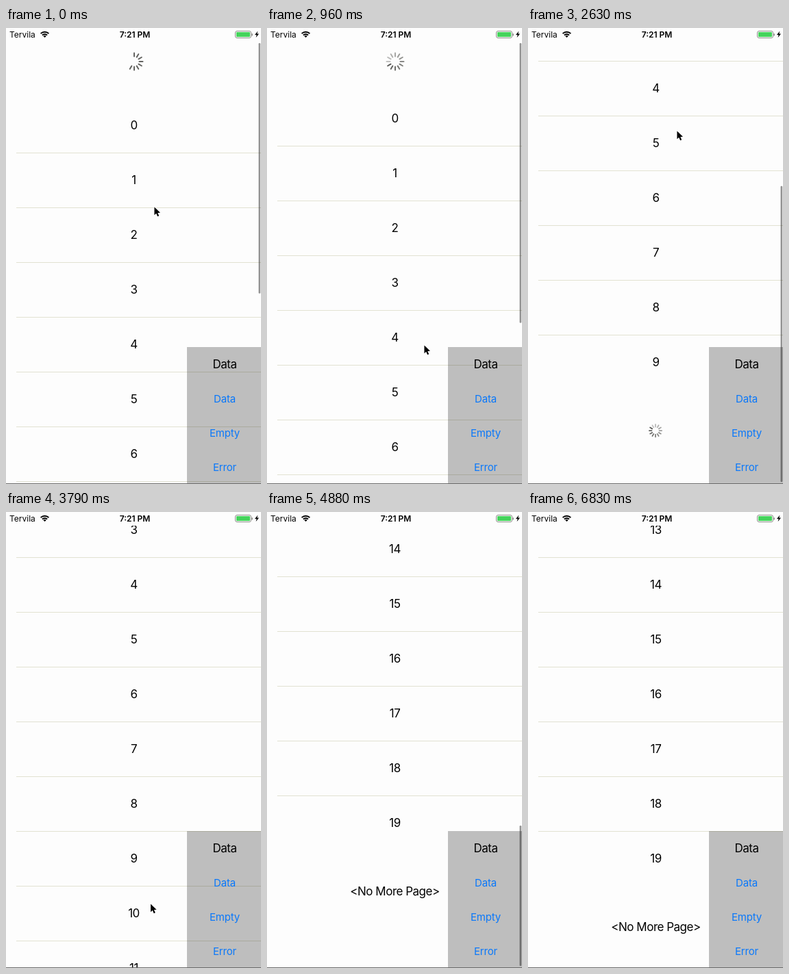
An HTML page with a canvas for the animation above (6930 ms loop, 372 by 666 pixels).

```html
<!DOCTYPE html>
<html>
<head>
<meta charset="utf-8">
<style>
  html, body { margin: 0; width: 100%; height: 100%; overflow: hidden; background: #fdfdfd; }
  canvas { display: block; }
</style>
</head>
<body>
<canvas id="stage" width="372" height="666"></canvas>
<script>
const c = document.getElementById('stage').getContext('2d');
const LOOP = 6930, ROW = 80, REST = 58, VIEW = 646;
const TRIGGER = 300, REFRESHED = 1450, LOADED = 3400;

const smooth = u => u * u * (3 - 2 * u);
const out = u => 1 - (1 - u) ** 3;
const clamp = u => Math.max(0, Math.min(1, u));

// Keys are [time, value, easing used to get there].
const firstRow = [
  [0, 142], [600, 215, out], [1356, 118, out], [1450, 118], [1700, 58, smooth],
  [2170, 58], [2560, -239.3, smooth], [3210, -214, out],
  [4270, -214], [4780, -1091.6, smooth], [5580, -1014, out]
];
const cursorX = [[0, 216], [600, 229, smooth], [960, 229], [1750, 214, smooth],
  [2170, 214], [2560, 217], [3100, 217], [3700, 210, smooth], [4600, 216]];
const cursorY = [[0, 260], [600, 463, out], [960, 463], [1700, 514, smooth],
  [2170, 520], [2560, 150, smooth], [3100, 150], [3700, 572, smooth],
  [3850, 572], [4150, 626, smooth], [4270, 626], [4620, -24, smooth]];

function at(keys, t) {
  const i = keys.findIndex(k => k[0] > t);
  if (i < 0) return keys[keys.length - 1][1];
  const [t0, a] = keys[i - 1], [t1, b, ease = u => u] = keys[i];
  return a + (b - a) * ease((t - t0) / (t1 - t0));
}

function text(s, x, y, size, color = '#000', weight = 400, align = 'center') {
  c.font = `${weight} ${size}px Inter, Roboto, sans-serif`;
  c.letterSpacing = size > 16 ? '-0.5px' : size > 13 ? '-0.2px' : '0px';
  c.textAlign = align;
  c.fillStyle = color;
  c.fillText(s, x, y);
}

function box(x, y, w, h, r, color) {
  c.fillStyle = color;
  c.beginPath();
  c.roundRect(x, y, w, h, r);
  c.fill();
}

function polygon(points) {
  c.beginPath();
  points.forEach(([x, y]) => c.lineTo(x, y));
  c.closePath();
}

function spinner(x, y, r, width, alpha) {
  c.save();
  c.translate(x, y);
  c.strokeStyle = '#3c3c38';
  c.lineWidth = width;
  c.lineCap = 'round';
  for (let k = 0; k < 12; k++) {
    c.globalAlpha = alpha(k);
    c.beginPath();
    c.moveTo(0, -r * 0.55);
    c.lineTo(0, -r + width / 2);
    c.stroke();
    c.rotate(Math.PI / 6);
  }
  c.restore();
}

const spinning = (t, phase) => {
  const head = Math.floor(t * 12 / 1000) + phase;
  return k => 0.25 + 0.6 * (1 - ((head - k + 24) % 12) / 12);
};

function refreshControl(t, pull) {
  if (t < TRIGGER) {
    const shown = 8 + Math.floor((pull - 84) / 6);
    spinner(187, 49, 13.5, 2, k => k < shown ? 0.8 : 0);
  } else if (t < 1700) {
    const fade = 1 - clamp((t - REFRESHED) / 220), alpha = spinning(t, 9);
    spinner(187, 49, 13.5 * (0.4 + 0.6 * fade), 2, k => alpha(k) * fade);
  }
}

function list(t, y0) {
  const count = t < LOADED ? 10 : 20;
  c.save();
  c.beginPath();
  c.rect(0, 20, 372, 646);
  c.clip();
  if (t < 1700) refreshControl(t, y0 - REST);
  for (let k = 0; k < count; k++) {
    const y = y0 + k * ROW;
    if (y < -50 || y > 720) continue;
    text(k, 186.5, y + 6, 17);
    if (k < count - 1) {
      c.fillStyle = '#e2e2d2';
      c.fillRect(15, Math.round(y + 40), 357, 1);
    }
  }
  const foot = y0 + count * ROW + 20;
  if (count === 10) spinner(186, foot, 10, 1.8, spinning(t, 3));
  else text('<No More Page>', 186.5, foot + 6, 17);
  c.restore();
}

function panel() {
  c.fillStyle = 'rgba(0,0,0,.25)';
  c.fillRect(264, 466, 108, 200);
  text('Data', 319, 497, 17);
  ['Data', 'Empty', 'Error'].forEach((s, i) =>
    text(s, 319, 546.5 + 50 * i, 15, '#0a78fa'));
}

function scrollBar(t, y0) {
  const show = (from, to) => t < from ? 0 : 1 - clamp((t - to) / 250);
  const alpha = t < 2000 ? show(0, 1420) : t < 4000 ? show(2180, 3250) : show(4270, 6050);
  if (!alpha) return;
  const inset = t >= TRIGGER && t < REFRESHED ? 60 : 0;
  const more = t >= LOADED;
  const s = REST - y0 + inset, max = (more ? 1072 : 272) + inset;
  const content = (more ? 1612 : 920) + inset;
  const over = Math.max(0, -s, s - max);
  const size = 641 * VIEW / content - over;
  const top = 22 + (641 - size) * clamp(s / max);
  box(368.5, top, 2.7, size, 1.3, `rgba(0,0,0,${0.42 * alpha})`);
}

function statusBar() {
  text('Tervila', 5, 14, 12, '#000', 400, 'left');
  text('7:21 PM', 188, 14, 12, '#000', 600);

  const wifi = (r, w) => {
    c.lineWidth = w;
    c.beginPath();
    c.arc(56.5, 14, r, -Math.PI * 0.75, -Math.PI * 0.25);
    c.stroke();
  };
  c.strokeStyle = '#000';
  c.lineCap = 'butt';
  wifi(1.5, 3);
  wifi(5, 1.9);
  wifi(8.3, 1.9);

  c.strokeStyle = '#8c8c88';
  c.lineWidth = 1;
  c.beginPath();
  c.roundRect(334.5, 4.5, 23, 10, 2.5);
  c.stroke();
  box(336, 6, 20, 7, 1, '#45d45c');
  box(358.5, 8, 1.5, 3.5, 0.7, '#8c8c88');
  c.fillStyle = '#000';
  polygon([[367.3, 4.5], [363, 10], [365.6, 10], [364.6, 14], [369, 8.4], [366.3, 8.4]]);
  c.fill();
}

function cursor(x, y) {
  c.save();
  c.translate(x, y);
  c.scale(0.9, 0.9);
  polygon([[0.5, 0.5], [0.5, 13.5], [3.5, 10.8], [5.7, 15.8], [8, 14.8], [5.9, 9.9], [10, 9.7]]);
  c.lineJoin = 'round';
  c.lineWidth = 2;
  c.strokeStyle = '#fff';
  c.stroke();
  c.fillStyle = '#000';
  c.fill();
  c.restore();
}

function draw(now) {
  const t = now % LOOP, y0 = at(firstRow, t);
  c.fillStyle = '#fdfdfd';
  c.fillRect(0, 0, 372, 666);
  list(t, y0);
  scrollBar(t, y0);
  panel();
  statusBar();
  c.fillStyle = '#6a6a6a';
  c.fillRect(0, 665, 372, 1);
  cursor(at(cursorX, t), at(cursorY, t));
}

const start = performance.now();
function tick() {
  draw(performance.now() - start);
  requestAnimationFrame(tick);
}
tick();
</script>
</body>
</html>
```
